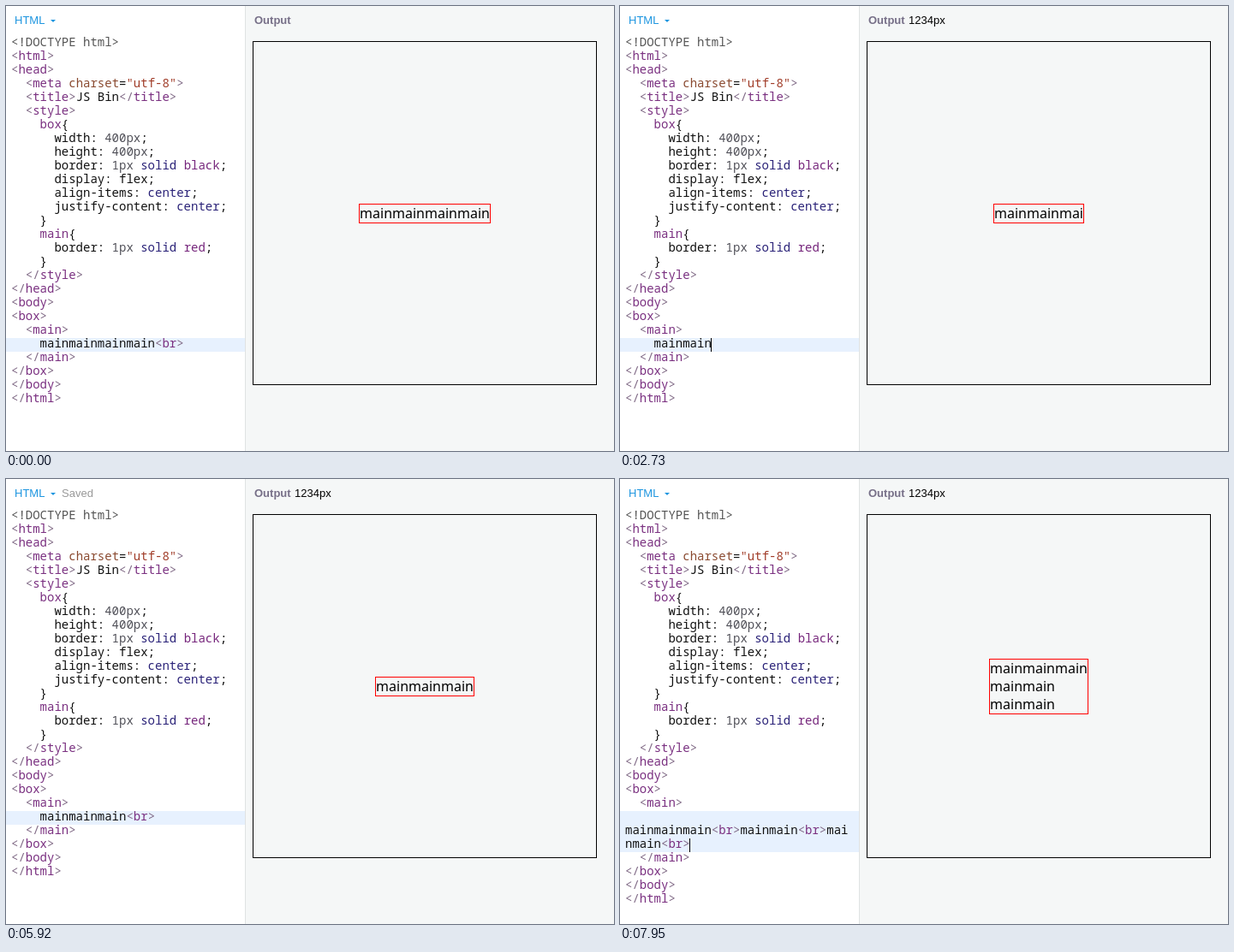
Write an HTML page that moves like this. It is 710 by 520 pixels and loops after 8 s.

```html
<!DOCTYPE html>
<html lang="en">
<head>
<meta charset="utf-8">
<title>Live code editor</title>
<style>
  html, body { margin: 0; width: 100%; height: 100%; overflow: hidden; background: #fff; }
  #stage { position: relative; width: 710px; height: 520px; overflow: hidden; font: 13px/16px "Liberation Sans", Arial, sans-serif; }
  #stage > * { position: absolute; }
  #panel { left: 279px; top: 0; width: 430px; height: 520px; border-left: 1px solid #e0e2e3; background: #f5f7f7; }
  .label { top: 9px; white-space: pre; }
  #lang { left: 10px; color: #1f96e0; }
  #arrow { left: 52px; top: 16px; border: 3px solid transparent; border-top-color: #1f96e0; border-bottom: 0; }
  #saved { left: 65px; color: #999; }
  #out { left: 290px; color: #777088; font-weight: bold; }
  #size { left: 337px; color: #000; }
  #code { left: 0; top: 34px; width: 279px; z-index: 0; font: 300 14px/16px "Noto Sans Mono", monospace; color: #111; }
  .row { position: relative; box-sizing: border-box; padding-left: 6px; width: 273px; min-height: 16px; white-space: pre-wrap; overflow-wrap: break-word; }
  #live::before { content: ""; position: absolute; z-index: -1; left: 0; top: 2px; width: 279px; height: 100%; background: #e7f1fe; }
  #caret { position: absolute; width: 1px; height: 16px; margin: 2px 0 0 -0.5px; background: #000; }
  .meta { color: #555; } .br { color: #806a86; } .tag { color: #7a3080; }
  .attr { color: #8a4a30; } .str { color: #a03c28; } .num { color: #505058; }
  .atom { color: #2a2278; } .key { color: #76267c; }
  #box { left: 288px; top: 41px; width: 400px; height: 400px; border: 1px solid #000; display: flex; align-items: center; justify-content: center; }
  #main { border: 1px solid red; white-space: pre; font: 16px/21px "Noto Sans", sans-serif; color: #000; }
</style>
</head>
<body>
<div id="stage">
  <div id="panel"></div>
  <div id="lang" class="label">HTML</div>
  <div id="arrow"></div>
  <div id="saved" class="label">Saved</div>
  <div id="out" class="label">Output</div>
  <div id="size" class="label">1234px</div>
  <div id="code"></div>
  <div id="box"><div id="main"></div></div>
</div>
<script>
const LOOP = 8000;
const HEAD = `<!DOCTYPE html>
<html>
<head>
  <meta charset="utf-8">
  <title>JS Bin</title>
  <style>
    box{
      width: 400px;
      height: 400px;
      border: 1px solid black;
      display: flex;
      align-items: center;
      justify-content: center;
    }
    main{
      border: 1px solid red;
    }
  <\/style>
</head>
<body>
<box>
  <main>`.split("\n");
const TAIL = ["  </main>", "</box>", "</body>", "</html>"];

const START = "main".repeat(4) + "<br>";
const PASTE = "mainmain<br>";
const cut = n => START.slice(0, n);
const P1 = "main" + PASTE, P2 = P1 + PASTE, P3 = P2 + PASTE;

// [time, changes]; each step keeps the values it does not name
const STEPS = [
  [0, { code: START, out: cut(16), caret: 0, saved: 0, size: 0 }],
  [520, { caret: 1 }],
  [670, { code: cut(19) }],
  [780, { code: cut(18) }],
  [900, { code: cut(17) }],
  [1020, { code: cut(16) }],
  [1150, { code: cut(15) }],
  [1300, { code: cut(14) }],
  [1520, { out: cut(14), size: 1 }],
  [1570, { code: cut(13) }],
  [1750, { code: cut(12) }],
  [1950, { code: cut(11) }],
  [2180, { out: cut(11) }],
  [2480, { caret: 0 }],
  [2520, { code: cut(10), caret: 1 }],
  [2680, { code: cut(9), saved: 1 }],
  [2730, { code: cut(8), saved: 0 }],
  [3000, { code: cut(7) }],
  [3160, { code: cut(6) }],
  [3380, { out: cut(6) }],
  [3590, { caret: 0 }],
  [3930, { code: cut(5), caret: 1, saved: 1 }],
  [4080, { code: cut(4) }],
  [4290, { out: cut(4) }],
  [4490, { caret: 0 }],
  [5070, { code: P1, caret: 1, saved: 0 }],
  [5300, { out: P1 }],
  [5640, { caret: 0 }],
  [5920, { saved: 1 }],
  [6170, { caret: 1 }],
  [6390, { code: P2, saved: 0 }],
  [6620, { out: P2 }],
  [6960, { caret: 0 }],
  [7320, { saved: 1 }],
  [7440, { caret: 1 }],
  [7720, { code: P3, saved: 0 }],
  [7950, { out: P3 }]
];
let last = {};
const states = STEPS.map(([at, change]) => last = { ...last, ...change, at });

const $ = id => document.getElementById(id);
const esc = s => s.replace(/</g, "&lt;").replace(/>/g, "&gt;");
const span = (type, s) => `<span class="${type}">${esc(s)}</span>`;
const RULES = [
  ["meta", /^<!DOCTYPE.*>/], ["br", /^<\/?|^>/], ["str", /^"[^"]*"/], ["attr", /^charset/],
  ["num", /^\d+px/], ["atom", /^(solid|center)\b/], ["key", /^(black|red)\b/],
  ["tag", /^(box|main)(?={)/]
];

function paint(line) {
  let html = "", inTag = false;
  while (line) {
    const name = inTag && line.match(/^[a-z]+/);
    const rule = !name && RULES.find(r => r[1].test(line));
    const s = name ? name[0] : rule ? line.match(rule[1])[0] : line.match(/^(\w+|.)/)[0];
    html += name ? span("tag", s) : rule ? span(rule[0], s) : esc(s);
    inTag = !!rule && rule[0] === "br" && s !== ">";
    line = line.slice(s.length);
  }
  return html;
}

const row = line => `<div class="row">${paint(line)}</div>`;
$("code").innerHTML = HEAD.map(row).join("") +
  '<div class="row" id="live"><span id="text"></span><span id="caret"></span></div>' +
  TAIL.map(row).join("");

const show = (id, on) => $(id).style.visibility = on ? "visible" : "hidden";
let shown;

function draw() {
  const t = performance.now() % LOOP;
  const s = states.filter(x => x.at <= t).pop();
  if (s !== shown) {
    shown = s;
    $("text").innerHTML = paint("    " + s.code);
    $("main").textContent = s.out.replace(/<br>$/, "").replace(/<br>/g, "\n");
    ["caret", "saved", "size"].forEach(id => show(id, s[id]));
  }
  requestAnimationFrame(draw);
}
draw();
</script>
</body>
</html>
```
